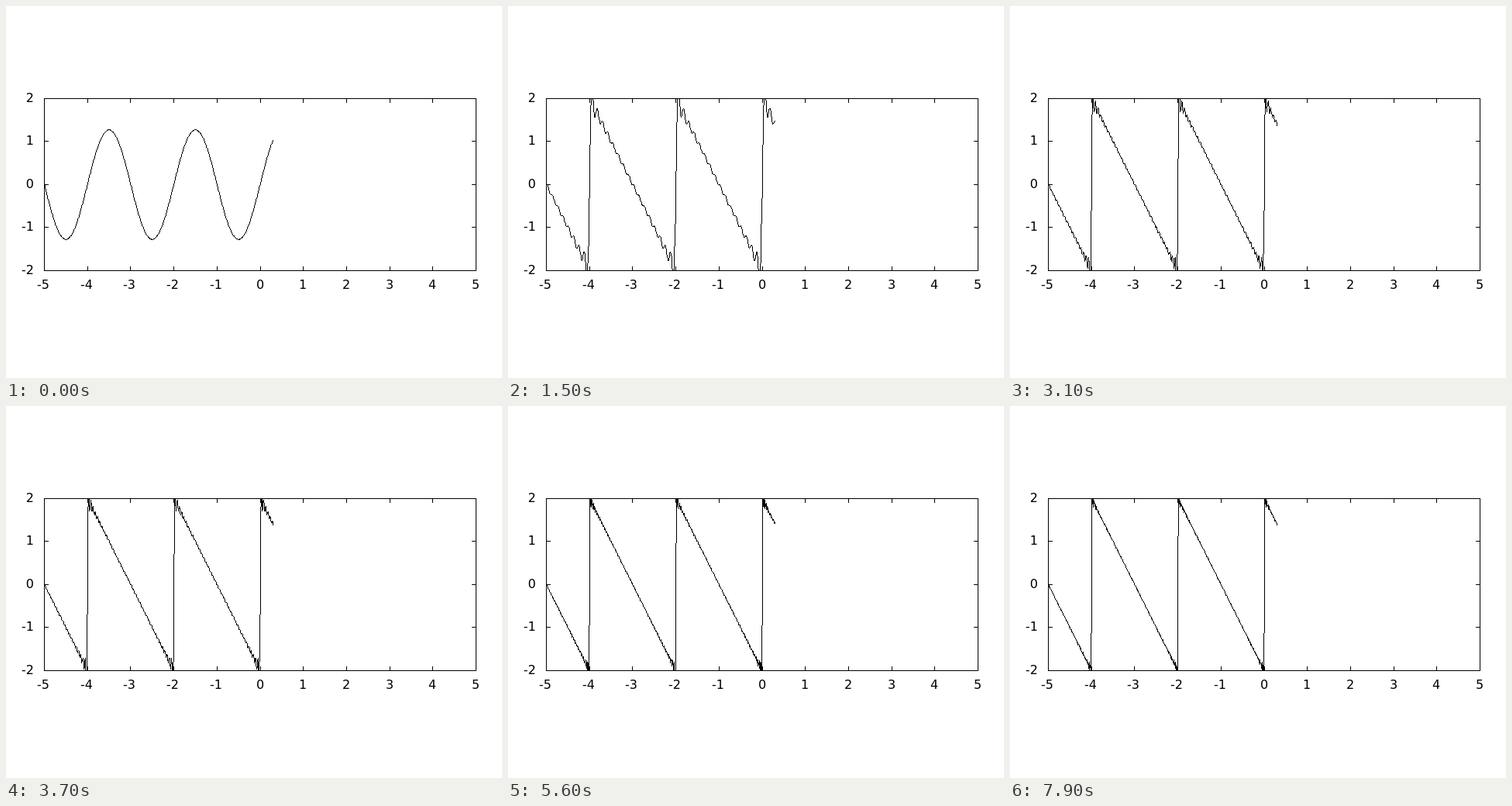
An HTML page with a canvas that plays this animation: 640 by 480 pixels, repeating every 8000 ms.

```html
<!DOCTYPE html>
<html>
<head>
<meta charset="utf-8">
<style>
  html, body { margin: 0; width: 100%; height: 100%; overflow: hidden; background: #fff; }
  canvas, svg { position: absolute; left: 0; top: 0; }
  text { font: 16px "DejaVu Sans", Verdana, sans-serif; }
</style>
</head>
<body>
<canvas id="plot" width="640" height="480"></canvas>
<svg id="labels" width="640" height="480"></svg>
<script>
const ctx = document.getElementById('plot').getContext('2d');
const labels = document.getElementById('labels');
const LEFT = 49, RIGHT = 606, TOP = 119, BOTTOM = 341, TIC = 5;
const STEP_MS = 100, STEPS = 80;

const px = x => LEFT + Math.round((x + 5) * (RIGHT - LEFT) / 10);
const py = y => BOTTOM - Math.round((y + 2) * (BOTTOM - TOP) / 4);

function dot(x, y) {
  if (x >= LEFT && x <= RIGHT && y >= TOP && y <= BOTTOM) ctx.fillRect(x, y, 1, 1);
}

// Hard-edged one-pixel line, stepped along its longer axis
function line(x1, y1, x2, y2) {
  const steep = Math.abs(y2 - y1) > Math.abs(x2 - x1);
  if (steep ? y1 > y2 : x1 > x2) [x1, y1, x2, y2] = [x2, y2, x1, y1];
  const dx = x2 - x1, dy = y2 - y1;
  const n = steep ? dy : dx, minor = steep ? dx : dy;
  for (let i = 0; i <= n; i++) {
    const m = n ? Math.sign(minor) * Math.floor(i * Math.abs(minor) / n + 0.5) : 0;
    if (steep) dot(x1 + m, y1 + i);
    else dot(x1 + i, y1 + m);
  }
}

function label(value, x, y, anchor) {
  const text = document.createElementNS('http://www.w3.org/2000/svg', 'text');
  text.setAttribute('x', x);
  text.setAttribute('y', y);
  text.setAttribute('text-anchor', anchor);
  text.textContent = value;
  labels.append(text);
}

function drawAxes() {
  line(LEFT, TOP, RIGHT, TOP);
  line(LEFT, BOTTOM, RIGHT, BOTTOM);
  line(LEFT, TOP, LEFT, BOTTOM);
  line(RIGHT, TOP, RIGHT, BOTTOM);
  for (let v = -5; v <= 5; v++) {
    const x = px(v);
    line(x, TOP, x, TOP + TIC);
    line(x, BOTTOM - TIC, x, BOTTOM);
  }
  for (let v = -2; v <= 2; v++) {
    const y = py(v);
    line(LEFT, y, LEFT + TIC, y);
    line(RIGHT - TIC, y, RIGHT, y);
  }
}

// Partial Fourier sum of a sawtooth
function sawtooth(x, terms) {
  let sum = 0;
  for (let k = 1; k <= terms; k++) sum += Math.sin(k * Math.PI * x) / k;
  return 4 / Math.PI * sum;
}

function drawCurve(terms) {
  let lastX, lastY;
  for (let i = -500; i <= 30; i++) {
    const x = px(i / 100), y = py(sawtooth(i / 100, terms));
    if (i > -500) line(lastX, lastY, x, y);
    lastX = x;
    lastY = y;
  }
}

for (let v = -5; v <= 5; v++) label(v, px(v) - (v < 0 ? 1 : 0), 365, 'middle');
for (let v = -2; v <= 2; v++) label(v, 36, py(v) + 5, 'end');

let shown = 0;
const start = performance.now();
function frame() {
  const terms = 1 + Math.floor((performance.now() - start) / STEP_MS) % STEPS;
  if (terms !== shown) {
    shown = terms;
    ctx.clearRect(0, 0, 640, 480);
    drawAxes();
    drawCurve(terms);
  }
  requestAnimationFrame(frame);
}
frame();
</script>
</body>
</html>
```
